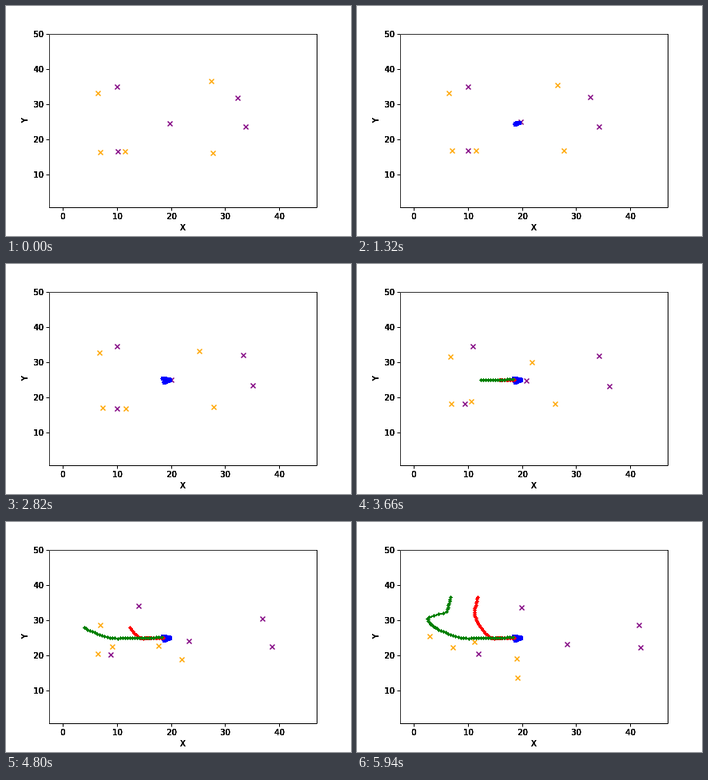
These frames come from a looping animation (432 px wide and 288 px high, 6 s). An HTML page:

```html
<!DOCTYPE html>
<html lang="en">
<head>
<meta charset="utf-8">
<title>Player tracks</title>
<style>
html, body { margin: 0; width: 100%; height: 100%; overflow: hidden; background: #fff; }
svg { display: block; width: 432px; height: 288px; }
text { font: 10px "DejaVu Sans", sans-serif; }
</style>
</head>
<body>
<svg id="plot" viewBox="0 0 432 288"></svg>
<script>
const svg = document.getElementById("plot");
const STEP = 60, COUNT = 100;
const snap = v => Math.floor(v) + .5;

function add(tag, attrs, text = "") {
  const el = document.createElementNS("http://www.w3.org/2000/svg", tag);
  for (const k in attrs) el.setAttribute(k, attrs[k]);
  el.textContent = text;
  return svg.appendChild(el);
}

// Stacked copies harden the soft glyph edges
function label(text, x, y, anchor = "middle", turn = 0) {
  const transform = `translate(${x} ${y}) rotate(${turn})`;
  for (let i = 0; i < 6; i++) add("text", { transform, "text-anchor": anchor }, text);
}

// Monotone cubic curve through (ts, vs)
function curve(ts, vs) {
  const n = ts.length - 1;
  const d = vs.slice(1).map((v, i) => (v - vs[i]) / (ts[i + 1] - ts[i]));
  const m = vs.map((_, i) => {
    const a = d[Math.max(i - 1, 0)], b = d[Math.min(i, n - 1)];
    return a * b > 0 ? 2 * a * b / (a + b) : 0;
  });
  return t => {
    let i = 0;
    while (i < n - 1 && t > ts[i + 1]) i++;
    const h = ts[i + 1] - ts[i], u = (t - ts[i]) / h, w = 1 - u;
    return vs[i] * w * w * (1 + 2 * u) + vs[i + 1] * u * u * (3 - 2 * u)
      + h * u * w * (m[i] * w - m[i + 1] * u);
  };
}

function motion(ts, points) {
  const x = curve(ts, points.map(p => p[0])), y = curve(ts, points.map(p => p[1]));
  return t => [x(t), y(t)];
}

// Axes
for (let i = 0; i < 5; i++) {
  const x = Math.round(71 + i * 67.75) + .5, y = Math.round(211 - i * 43.9) + .5;
  add("path", { d: `M${x} 252.5v4M54.5 ${y}h-4`, stroke: "#000" });
  label(i * 10, x, 267);
  label(i * 10 + 10, 47.2, y + 3.7, "end");
}
label("X", 221.4, 281);
label("Y", 27, 143.3, "middle", -90);

// Players drift slowly, then run: start, break, turn, end
const phases = [0, 47, 80, 99];
const teams = {
  "#ffa500": [
    [[115, 109], [117, 111], [118, 129], [91, 143]],
    [[118, 183], [121, 180], [115, 165], [120, 157]],
    [[149, 182], [150, 181], [133, 156], [147, 150]],
    [[257, 94], [242, 109], [191, 155], [201, 195]],
    [[259, 184], [260, 179], [220, 172], [200, 171]]
  ],
  "#800080": [
    [[139, 101], [139, 103], [166, 105], [206, 107]],
    [[140, 182], [139, 181], [131, 166], [152, 165]],
    [[205, 147], [207, 145], [229, 149], [263, 153]],
    [[290, 115], [297, 114], [321, 121], [353, 129]],
    [[300, 151], [309, 152], [333, 156], [355, 157]]
  ]
};
const players = Object.entries(teams).flatMap(([stroke, list]) => list.map(points => ({
  el: add("path", { d: "M-3-3 3 3M-3 3 3-3", stroke, "stroke-width": 1.5 }),
  at: motion(phases, points)
})));

// One dot per step, joined by a line
function trail(stroke, r, ts, points) {
  const pen = width => add("path", {
    fill: "none", stroke, "stroke-width": width, "stroke-linecap": "round",
    "stroke-linejoin": "round", "shape-rendering": "crispEdges"
  });
  return {
    line: pen(2), dots: pen(2 * r),
    first: ts[0], last: ts[ts.length - 1], at: motion(ts, points)
  };
}
const trails = [
  trail("#0000ff", 3, [1, 14, 22, 36, 47],
    [[203, 146], [198, 148], [201, 146], [196, 143], [205, 145]]),
  trail("#ff0000", 2.3, [48, 66, 80, 91, 99],
    [[197, 145.5], [172, 146], [155.5, 132.5], [147.5, 113], [151.5, 94.5]]),
  trail("#008000", 2.3, [48, 66, 80, 87, 92, 99],
    [[195, 144.8], [140, 146], [98.5, 132.5], [88.7, 121], [112, 112], [117.5, 94.5]])
];

add("path", { d: "M54.5 253V35.5H390", fill: "none", stroke: "#333" });
add("path", { d: "M54 252.5H389.5V35", fill: "none", stroke: "#000" });

function render(ms) {
  const step = Math.floor(ms / STEP) % COUNT;
  for (const p of players) {
    p.el.setAttribute("transform", `translate(${p.at(step).map(snap)})`);
  }
  for (const t of trails) {
    const pts = [];
    for (let i = t.first; i <= Math.min(step, t.last); i++) pts.push(t.at(i).map(snap));
    t.line.setAttribute("d", pts.length ? "M" + pts.join("L") : "");
    t.dots.setAttribute("d", pts.map(p => `M${p}h.01`).join(""));
  }
}

const start = performance.now();
function tick() {
  render(performance.now() - start);
  requestAnimationFrame(tick);
}
render(0);
requestAnimationFrame(tick);
</script>
</body>
</html>
```
